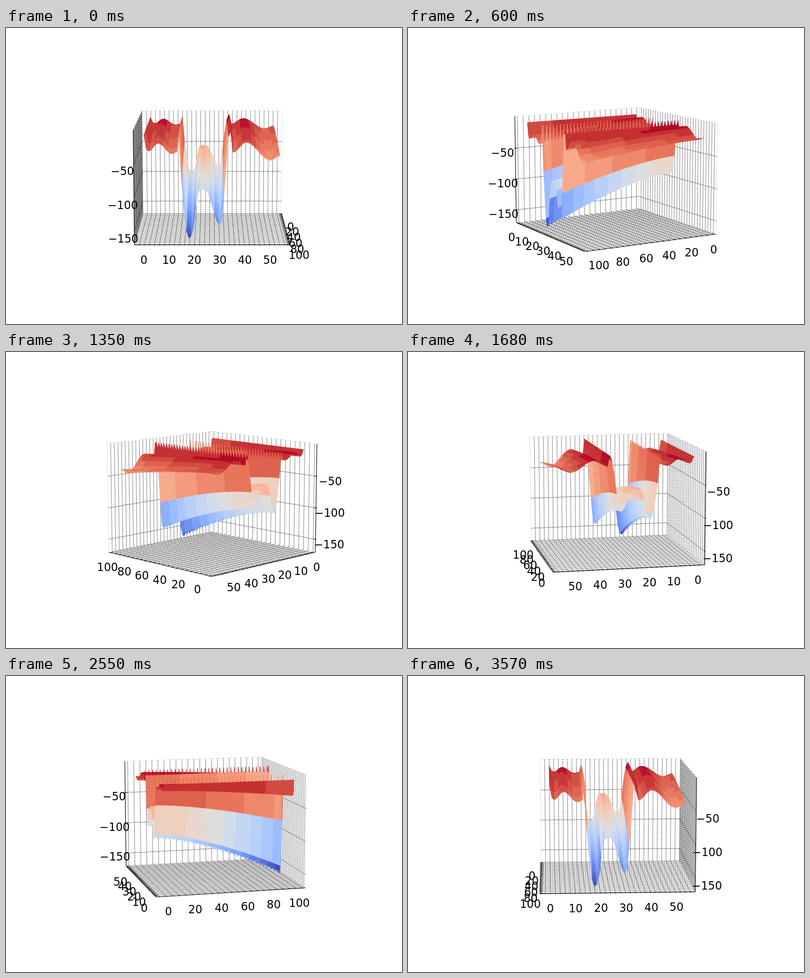
Recreate the animation shown at these times as an HTML page with a canvas. Size 800 by 600 pixels, loop 3.6 s.

```html
<!DOCTYPE html>
<html>
<head>
<meta charset="utf-8">
<style>
html, body { margin: 0; width: 800px; height: 600px; overflow: hidden; background: #fff; }
canvas { display: block; }
</style>
</head>
<body>
<canvas id="stage" width="800" height="600"></canvas>
<script>
const ctx = document.getElementById('stage').getContext('2d');
const FRAME_MS = 30, FRAMES = 120;
const CENTER_X = 416.2, CENTER_Y = 296.8, SCALE = 2497, DISTANCE = 10;
const ELEV = Math.PI / 18, SIN_E = Math.sin(ELEV), COS_E = Math.cos(ELEV);

// Half sizes of the pane box; the data range fills 24/25 of it
const PANE = [0.5955, 0.5955, 0.4466];
const RANGES = [[-5, 105], [-2.7, 56.7], [-167.2, -2.6]];
const AXES = [
  { step: 5, labelStep: 20, first: -5, flip: 1 },
  { step: 2, labelStep: 10, first: -2, flip: 0 },
  { step: 50, labelStep: 50, first: -150, flip: 0 }
];
const TICK = 2 * PANE[0] / 12.5, LABEL_PAD = PANE.map(half => half * 0.1325);

const ROWS = 101, COLS = 59, ROW_STRIDE = 3, COL_STRIDE = 2;
// Turning points of the cross section at x = 0, joined by cosine easing
const TURNS = [
  [0, -14], [2, -18], [6, -10.5], [12, -20.5], [14, -18.5], [19, -100], [20, -98],
  [23.5, -54], [26, -54], [32.5, -88], [36, -19], [38, -19], [43.5, -9.7], [54, -26.5], [58, -22]
];
// Columns that keep their height along the whole x axis
const CRESTS = { 0: -8, 15: -7, 36: -11, 37: -3 };

const lerp = (a, b, t) => a + (b - a) * t;

function toBox(value, axis) {
  const [lo, hi] = RANGES[axis];
  return ((value - lo) / (hi - lo) * 2 - 1) * PANE[axis] * 24 / 25;
}

function height(row, col) {
  if (col in CRESTS) return CRESTS[col];
  const k = TURNS.findIndex(turn => turn[0] >= col);
  const [c0, z0] = TURNS[k - 1], [c1, z1] = TURNS[k];
  const base = lerp(z0, z1, (1 - Math.cos(Math.PI * (col - c0) / (c1 - c0))) / 2);
  return base + (0.6 * base - 4) * (row / 100) ** 1.5;
}

// Diverging blue-white-red map: polar interpolation in Lab space
function coolwarm(t) {
  const gray = 1 - Math.abs(2 * t - 1);
  const m = lerp(80, 88, gray), s = lerp(1.08, 0, gray);
  const h = t < 0.5 ? lerp(-1.1, -1.661, gray) : lerp(0.5, 1.061, gray);
  const fy = (m * Math.cos(s) + 16) / 116;
  const x = 0.9505 * (fy + m * Math.sin(s) * Math.cos(h) / 500) ** 3;
  const y = fy ** 3;
  const z = 1.089 * (fy - m * Math.sin(s) * Math.sin(h) / 200) ** 3;
  const linear = [
    3.2406 * x - 1.5372 * y - 0.4986 * z,
    -0.9689 * x + 1.8758 * y + 0.0415 * z,
    0.0557 * x - 0.204 * y + 1.057 * z
  ];
  const gamma = v => 255 * (1.055 * Math.max(v, 0.0031) ** (1 / 2.4) - 0.055);
  return `rgb(${linear.map(v => Math.max(0, Math.min(255, Math.round(gamma(v)))))})`;
}

// Each patch is outlined by every sample along its perimeter
function buildPatches() {
  const patches = [];
  for (let r = 0; r < ROWS - 1; r += ROW_STRIDE) {
    for (let c = 0; c < COLS - 1; c += COL_STRIDE) {
      const r2 = Math.min(r + ROW_STRIDE, ROWS - 1), c2 = Math.min(c + COL_STRIDE, COLS - 1);
      const cells = [];
      for (let j = c; j < c2; j++) cells.push([r, j]);
      for (let i = r; i < r2; i++) cells.push([i, c2]);
      for (let j = c2; j > c; j--) cells.push([r2, j]);
      for (let i = r2; i > r; i--) cells.push([i, c]);
      const heights = cells.map(([i, j]) => height(i, j));
      patches.push({
        mean: heights.reduce((a, b) => a + b) / heights.length,
        points: cells.map(([i, j], n) =>
          [toBox(i, 0), toBox(j * 54 / (COLS - 1), 1), toBox(heights[n], 2)])
      });
    }
  }
  const means = patches.map(p => p.mean);
  const lo = Math.min(...means), hi = Math.max(...means);
  for (const p of patches) p.fill = coolwarm(Math.round((p.mean - lo) / (hi - lo) * 24) / 24);
  return patches;
}
const patches = buildPatches();

let sinA = 0, cosA = 1;

function project([x, y, z]) {
  const across = y * cosA - x * sinA, toward = x * cosA + y * sinA;
  const depth = DISTANCE - toward * COS_E - z * SIN_E;
  return [CENTER_X + across * SCALE / depth,
    CENTER_Y - (z * COS_E - toward * SIN_E) * SCALE / depth, depth];
}

function trace(points) {
  ctx.beginPath();
  for (const p of points) ctx.lineTo(p[0], p[1]);
}

function line(points, style, width, dash = []) {
  ctx.strokeStyle = style;
  ctx.lineWidth = width;
  ctx.setLineDash(dash);
  trace(points.map(project));
  ctx.stroke();
}

const withValue = (point, axis, value) => point.map((v, i) => i === axis ? value : v);
const flipped = (point, axis) => withValue(point, axis, -point[axis]);
const otherAxes = axis => [0, 1, 2].filter(i => i !== axis);

function ticks(axis) {
  const { step, first } = AXES[axis], list = [];
  for (let v = first; v <= RANGES[axis][1]; v += step) list.push(v);
  return list;
}

function drawPanes(far) {
  for (let normal = 0; normal < 3; normal++) {
    const [a, b] = otherAxes(normal);
    line([far, flipped(far, a), flipped(flipped(far, a), b), flipped(far, b), far], '#e4e4e4', 1);
  }
}

function drawGrid(far, axis) {
  const [a, b] = otherAxes(axis);
  for (const v of ticks(axis)) {
    const corner = withValue(far, axis, toBox(v, axis));
    line([flipped(corner, a), corner, flipped(corner, b)], '#000', 0.7, [2.6, 1.1]);
  }
}

function drawAxis(far, axis) {
  const { flip, labelStep } = AXES[axis];
  const edge = flipped(far, flip);
  line([withValue(edge, axis, -PANE[axis]), withValue(edge, axis, PANE[axis])], '#000', 1.1);
  const out = Math.sign(edge[flip]) * TICK;
  for (const v of ticks(axis)) {
    const at = withValue(edge, axis, toBox(v, axis));
    line([withValue(at, flip, at[flip] + 0.1 * out), withValue(at, flip, at[flip] - 0.2 * out)], '#000', 1.1);
    if (v % labelStep) continue;
    const [x, y] = project(at.map((p, i) => i === axis ? p : p + Math.sign(p) * LABEL_PAD[i]));
    ctx.fillText(String(v).replace('-', '\u2212'), x, y + 18);
  }
}

function drawSurface() {
  const shapes = patches.map(({ points, fill }) => {
    const outline = points.map(project);
    return { outline, fill, depth: outline.reduce((sum, p) => sum + p[2], 0) / outline.length };
  });
  shapes.sort((a, b) => b.depth - a.depth);
  ctx.setLineDash([]);
  ctx.lineWidth = 0.5;
  ctx.lineJoin = 'bevel';
  for (const { outline, fill } of shapes) {
    ctx.fillStyle = ctx.strokeStyle = fill;
    trace(outline);
    ctx.closePath();
    ctx.fill();
    ctx.stroke();
  }
}

function draw(frame) {
  const azimuth = frame / FRAMES * 2 * Math.PI;
  sinA = Math.sin(azimuth);
  cosA = Math.cos(azimuth);
  const far = [cosA >= 0 ? -PANE[0] : PANE[0], sinA >= 0 ? -PANE[1] : PANE[1], -PANE[2]];
  ctx.fillStyle = '#fff';
  ctx.fillRect(0, 0, 800, 600);
  ctx.fillStyle = '#000';
  ctx.font = '22.2px "DejaVu Sans", sans-serif';
  ctx.textAlign = 'center';
  drawPanes(far);
  for (let axis = 0; axis < 3; axis++) {
    drawGrid(far, axis);
    drawAxis(far, axis);
  }
  drawSurface();
}

let shown = -1;
function tick() {
  const frame = Math.floor(performance.now() / FRAME_MS) % FRAMES;
  if (frame !== shown) draw(shown = frame);
  requestAnimationFrame(tick);
}
tick();
</script>
</body>
</html>
```
